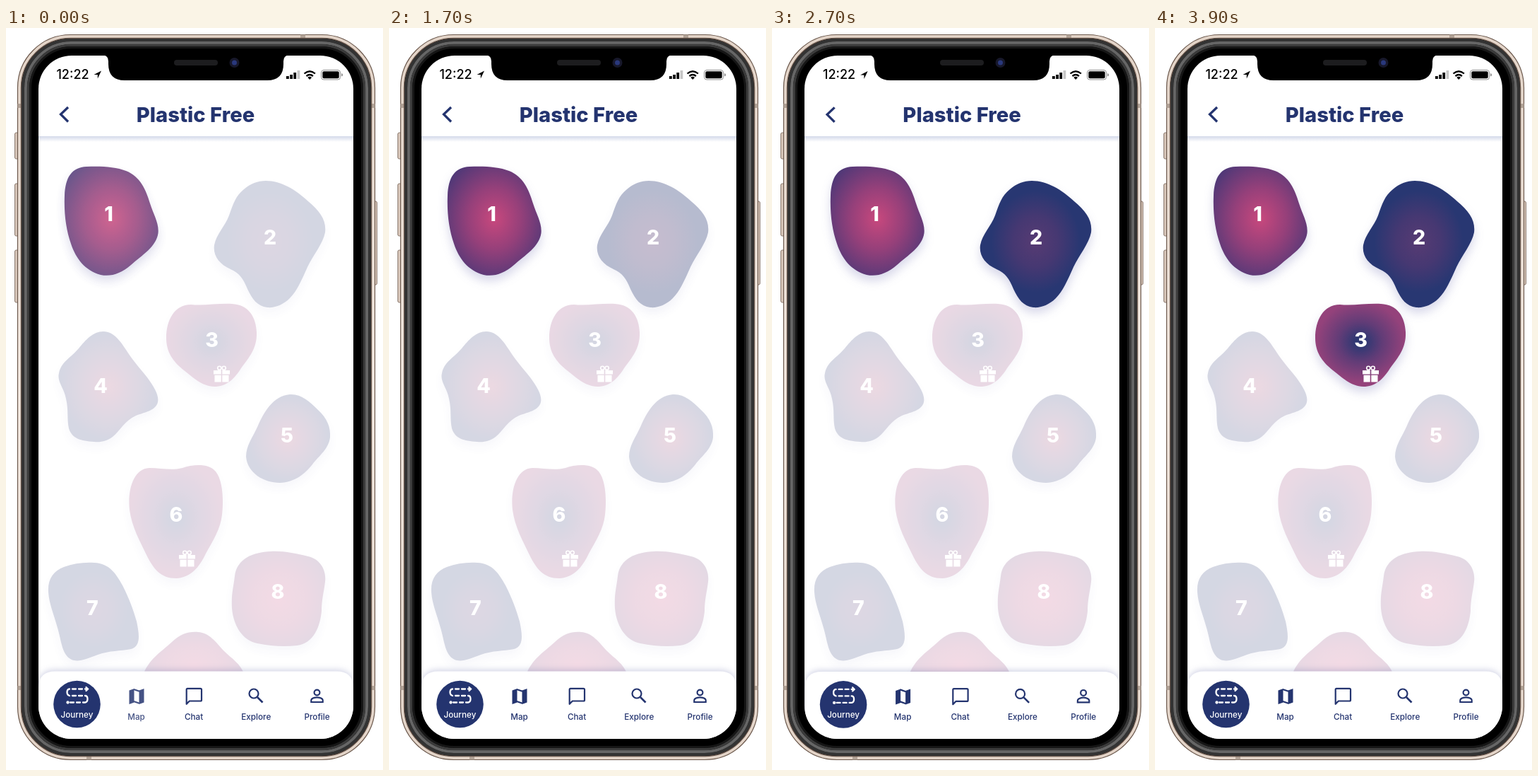
Recreate the animation shown at these times as an HTML page. Size 534 px wide and 1049 px high, loop 4.1 s.

```html
<!DOCTYPE html>
<html lang="en">
<head>
<meta charset="utf-8">
<title>Journey</title>
<style>
  html, body { margin: 0; width: 100%; height: 100%; overflow: hidden; background: #fff; }
  svg { display: block; width: 100vw; height: 100vh; }
  text { font-family: Inter, Roboto, sans-serif; text-anchor: middle; }
  .title { font-size: 29.2px; font-weight: 800; fill: #24346f; }
  .num { font-size: 28.5px; font-weight: 800; fill: #fff; }
  .label { font-size: 11.7px; font-weight: 500; fill: #24346f; }
  .blob { opacity: .2; filter: drop-shadow(0 8px 7px rgba(60, 60, 150, .2)); }
  .line { fill: none; stroke: #24346f; stroke-width: 2.2; }
  .one, .map { animation: settle 4.1s infinite; }
  .two { animation: second 4.1s infinite; }
  .three { animation: third 4.1s infinite; }
  .ui { animation: nudge 4.1s step-end infinite; }
  @keyframes settle {
    0% { opacity: .85; animation-timing-function: steps(2, end); }
    4.878%, 100% { opacity: 1; }
  }
  @keyframes second {
    0%, 39.024% { opacity: .2; animation-timing-function: steps(6, end); }
    53.658%, 100% { opacity: 1; }
  }
  @keyframes third {
    0%, 70.731% { opacity: .2; animation-timing-function: steps(5, end); }
    82.926%, 100% { opacity: 1; }
  }
  @keyframes nudge {
    0% { transform: none; }
    65.853% { transform: translate(.6px, .4px); }
    87.804%, 100% { transform: none; }
  }
</style>
</head>
<body>
<svg viewBox="0 0 534 1049" preserveAspectRatio="none">
  <defs>
    <radialGradient id="rose" cx=".5" cy=".48" r=".62">
      <stop offset="0" stop-color="#c8487d"/><stop offset=".45" stop-color="#96407a"/><stop offset=".95" stop-color="#503877"/>
    </radialGradient>
    <radialGradient id="dusk" cx=".5" cy=".48" r=".5">
      <stop offset="0" stop-color="#573b73"/><stop offset=".4" stop-color="#463872"/><stop offset=".8" stop-color="#283772"/>
    </radialGradient>
    <radialGradient id="core" cx=".5" cy=".46" r=".54">
      <stop offset=".1" stop-color="#2f3873"/><stop offset=".45" stop-color="#623c77"/><stop offset=".9" stop-color="#94427b"/>
    </radialGradient>
    <radialGradient id="glow" cx=".5" cy=".5" r=".5">
      <stop offset="0" stop-color="#a0406f"/><stop offset=".45" stop-color="#6c3e73"/><stop offset=".95" stop-color="#303a74"/>
    </radialGradient>
    <radialGradient id="blush" cx=".5" cy=".5" r=".6">
      <stop offset="0" stop-color="#c4487c"/><stop offset=".5" stop-color="#a6447b"/><stop offset="1" stop-color="#6f4379"/>
    </radialGradient>
    <linearGradient id="shade" x2="0" y2="1">
      <stop offset="0" stop-color="#d3d9ea"/><stop offset="1" stop-color="#fff"/>
    </linearGradient>
    <linearGradient id="gold" x2="0" y2="1">
      <stop offset="0" stop-color="#e3d4c8"/><stop offset=".5" stop-color="#f5ebe3"/><stop offset="1" stop-color="#e3d4c8"/>
    </linearGradient>
    <clipPath id="screen"><rect x="46" y="39" width="446" height="966" rx="47"/></clipPath>
    <g id="gift" fill="#fff">
      <path d="M0 7h10.700v5.500H0zM12.300 7H23v5.500H12.300zM1.500 13.800h9.200v9.700H1.500zM12.300 13.800h9.200v9.700h-9.200z"/>
      <g fill="none" stroke="#fff" stroke-width="1.600">
        <circle cx="8.300" cy="3.800" r="2.600"/><circle cx="14.700" cy="3.800" r="2.600"/>
      </g>
    </g>
  </defs>

  <!-- phone body -->
  <g fill="#d9c8bb" stroke="#806e62" stroke-width=".9">
    <rect x="12.500" y="148" width="6" height="37" rx="2"/>
    <rect x="12.500" y="220" width="6" height="74" rx="2"/>
    <rect x="12.500" y="314" width="6" height="74" rx="2"/>
    <rect x="520" y="245" width="5.500" height="118" rx="2"/>
  </g>
  <rect x="16.500" y="9.500" width="506" height="1025" rx="75" fill="url(#gold)" stroke="#6b584c" stroke-width="1.200"/>
  <path d="M417 9.500h7v5h-7zM114 1029.500h7v5h-7zM16.500 107h5v6h-5zM16.500 930h5v6h-5zM517.500 107h5v6h-5zM517.500 930h5v6h-5z" fill="#b2a397"/>
  <g fill="none">
    <rect x="21.500" y="14.500" width="496" height="1015" rx="70" fill="#000" stroke="#66544a" stroke-width="1.500"/>
    <rect x="24" y="17" width="491" height="1010" rx="68" stroke="#333" stroke-width="4"/>
    <rect x="28" y="21" width="483" height="1002" rx="64" stroke="#666" stroke-width="4"/>
    <rect x="31.500" y="24.500" width="476" height="995" rx="61" stroke="#3b3b3b" stroke-width="3.500"/>
    <rect x="34.500" y="27.500" width="470" height="989" rx="58" stroke="#161616" stroke-width="3"/>
  </g>

  <g clip-path="url(#screen)">
    <path d="M46 39h446v966H46z" fill="#fff"/>

    <!-- journey stones -->
    <path class="blob one" fill="url(#rose)" d="M114 196C134 195 155 196 170 202C190 210 198 228 204 248C209 264 217 276 215.500 290C213 309 193 321 177 335C163 347 149 352 134 349C112 343 99 326 92 305C85 285 82 262 83 237C84 211 93 197 114 196Z"/>
    <path class="blob two" fill="url(#dusk)" d="M368 216C390 216 411 229 428 245C445 259 454 272 452 289C449 305 435 321 427 338C418 358 412 372 402 382C392 392 380 396 370 395C356 393 349 384 342 369C336 354 331 347 318 341C302 334 293 322 295 307C298 291 310 281 316 265C322 248 325 238 337 228C346 220 357 216 368 216Z"/>
    <path class="blob three" fill="url(#core)" d="M262 391C280 393 300 389 320 390C344 391 354 409 355 430C356 453 344 466 333 481C323 497 312 507 295 507C277 506 266 495 252 484C236 471 227 458 227 438C227 414 238 391 262 391Z"/>
    <path class="blob" fill="url(#glow)" d="M138 429C153 429 163 444 172 458C181 472 189 480 200 494C210 508 217 519 215 529C212 541 197 543 184 548C168 555 162 569 151 578C143 584 134 586 125 585C106 584 93 580 89 566C86 551 89 542 85 524C82 508 72 500 75 488C78 472 92 466 103 453C113 441 123 429 138 429Z"/>
    <path class="blob" fill="url(#glow)" d="M402 518C418 517 430 528 442 540C455 552 460 564 459 579C457 595 444 604 434 617C423 631 409 642 388 643C365 643 342 629 340 606C340 590 350 578 357 562C365 544 378 520 402 518Z"/>
    <path class="blob" fill="url(#core)" d="M203 622C220 622 234 626 250 622C265 617 287 615 297 627C308 641 308 670 306 688C304 708 293 725 283 743C274 762 262 777 241 778C219 778 209 765 199 745C190 726 178 705 175 681C172 654 180 623 203 622Z"/>
    <path class="blob" fill="url(#dusk)" d="M125 756C147 757 156 772 165 788C174 806 180 821 185 839C189 858 191 874 177 878C161 881 147 880 130 886C113 892 103 897 93 893C79 886 79 868 73 848C67 826 61 814 60 797C59 779 67 768 82 762C96 757 110 755 125 756Z"/>
    <path class="blob" fill="url(#blush)" d="M375 740C393 739 410 743 428 747C445 751 454 766 452 783C450 799 447 808 447 824C445 846 436 870 412 873C394 875 376 874 356 870C335 866 322 845 320 820C319 800 322 792 324 775C327 750 350 741 375 740Z"/>
    <path class="blob" fill="url(#blush)" d="M195 912C205 890 220 882 235 868C247 857 258 853 272 854C288 855 297 868 308 880C320 892 332 898 338 915C350 960 190 960 195 912Z"/>
    <g class="num">
      <text x="145.500" y="273">1</text><text x="374" y="306">2</text>
      <text x="291.500" y="451">3</text><text x="134" y="516">4</text>
      <text x="398" y="586">5</text><text x="241" y="698">6</text>
      <text x="122.500" y="830">7</text><text x="385" y="807">8</text>
    </g>
    <use href="#gift" x="294" y="477"/>
    <use href="#gift" x="245" y="738"/>

    <!-- header -->
    <path d="M46 153h446v8H46z" fill="url(#shade)"/>
    <g class="ui">
      <path d="M88 112L77.500 122L88 132.500" fill="none" stroke="#24346f" stroke-width="3.300"/>
      <text class="title" x="268.500" y="132.500">Plastic Free</text>
      <text x="94.500" y="72" font-size="18" font-weight="500">12:22</text>
      <path d="M135 60.500L124.500 66h5.300v5.500z"/>
    </g>

    <!-- tab bar -->
    <g class="ui">
      <path d="M46 1010V933Q46 909.500 70 909.500H468Q492 909.500 492 933V1010Z" fill="#fff" style="filter:drop-shadow(0 -2px 4px rgba(70,80,150,.25))"/>
      <circle cx="100.500" cy="956" r="33.300" fill="#24346f"/>
      <g fill="none" stroke="#fff" stroke-width="2.300" stroke-linecap="round">
        <path d="M94 934.500h5m4 0h5m4 0h4m-2.500-2.500l2.500 2.500l-2.500 2.500M90 934.500Q86.500 935 86.500 939T90 944M94 944h5m4 0h5M112 944q3.500 0 3.500 4.500t-3.500 5M91 953.500h5m4 0h5m4 0h2"/>
        <circle cx="87.500" cy="953.500" r="1"/>
      </g>
      <text class="label" x="100.500" y="975" style="fill:#fff">Journey</text>

      <g class="map">
        <path d="M174.500 936.500l7-2.500v19.500l-7 2.500zM188.500 936.500l7-2.500v19.500l-7 2.500z" fill="#24346f"/>
        <path class="line" d="M181 935l8 2.800M181 952l8 2.800"/>
        <text class="label" x="184.500" y="977.500">Map</text>
      </g>

      <path class="line" stroke-linejoin="round" d="M257 933.800h18.500q1.500 0 1.500 1.500v14.700q0 1.500-1.500 1.500h-15.700l-4.100 4.300V935.300q0-1.500 1.300-1.500z"/>
      <text class="label" x="266" y="977.500">Chat</text>

      <circle class="line" cx="351" cy="941" r="6.500"/>
      <path class="line" d="M356 946l7.500 7.500" style="stroke-width:2.600"/>
      <text class="label" x="354.300" y="977.500">Explore</text>

      <circle class="line" cx="440.500" cy="939.500" r="3.900"/>
      <path class="line" d="M432.300 953v-2.500c0-2.800 5.200-4.200 8.200-4.200s8.200 1.400 8.200 4.200v2.500z"/>
      <text class="label" x="440.600" y="977.500">Profile</text>
    </g>
  </g>

  <!-- notch and status icons -->
  <path d="M137 38Q145 39 145 47V51Q145 74 168 74H370Q393 74 393 51V47Q393 39 401 38Z"/>
  <rect x="238" y="45" width="62" height="8" rx="4" fill="#1d1d1f"/>
  <circle cx="323.500" cy="49" r="7" fill="#17182b"/>
  <circle cx="323.500" cy="49" r="3.500" fill="#29387c"/>
  <path d="M397 68h3.800v4H397zM402.200 66h3.800v6h-3.800zM407.300 63h3.800v9h-3.800z"/>
  <path d="M412.500 60h3.800v12h-3.800z" fill="#c6c6c6"/>
  <g fill="none" stroke="#000" stroke-width="2.300">
    <path d="M422.500 64.500q7.700-6.600 15.400 0M425.500 68q4.700-4 9.400 0"/>
  </g>
  <path d="M427.300 70q2.900-2.400 5.800 0l-2.900 3z"/>
  <rect x="446.500" y="59.500" width="27" height="13.500" rx="3.500" fill="none" stroke="#8d8d8d"/>
  <rect x="448.300" y="61.300" width="23.400" height="9.900" rx="2"/>
  <path d="M475 64q2 .5 2 2.300t-2 2.300z" fill="#8d8d8d"/>
</svg>
</body>
</html>
```
